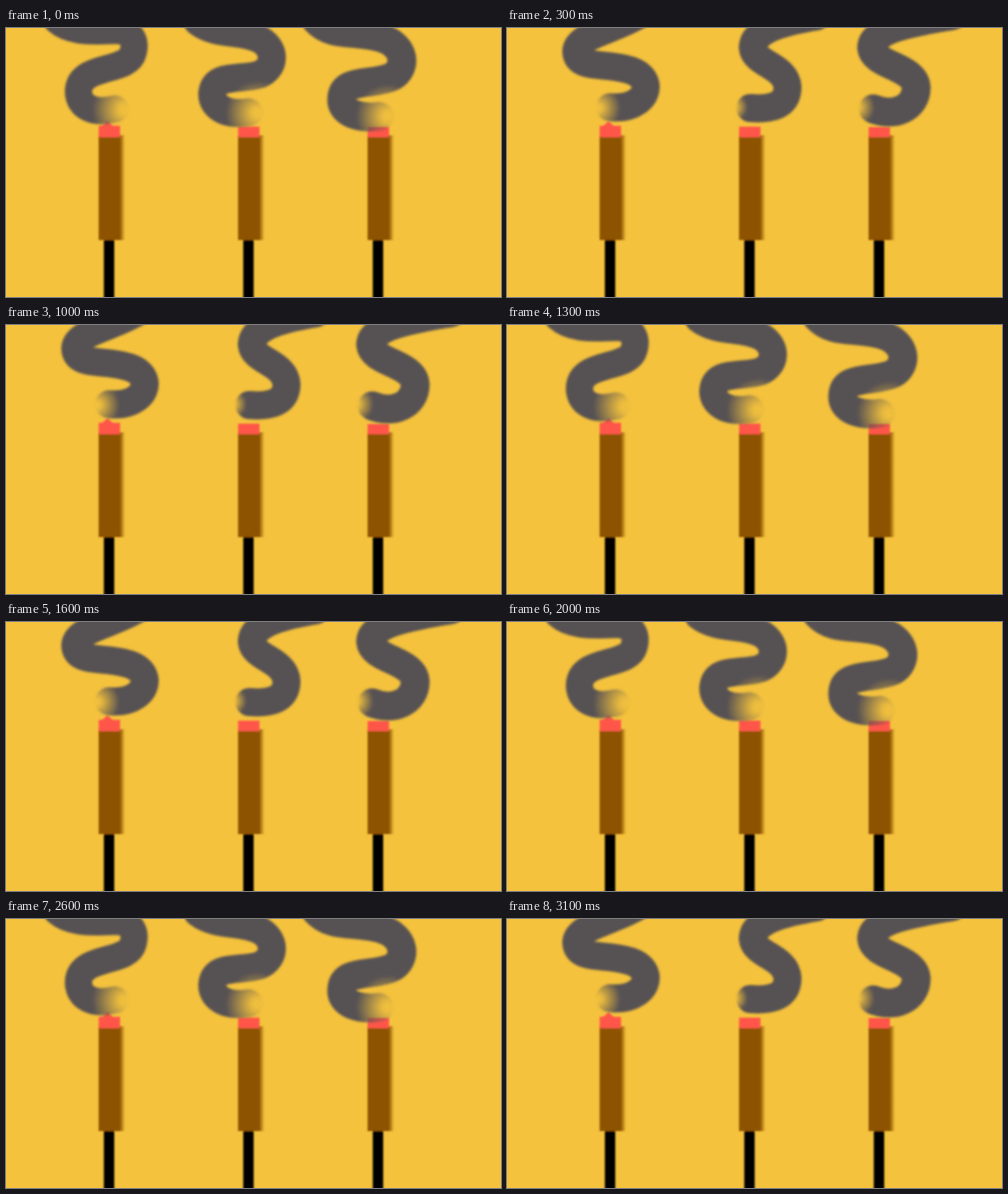
An HTML page for the animation above (3.2 s loop, 600x326 px).

```html
<!DOCTYPE html>
<html lang="en">
<head>
<meta charset="utf-8">
<title>Incense</title>
<style>
html, body { margin: 0; width: 100%; height: 100%; overflow: hidden; background: #f4c23d; }
svg { display: block; width: 100%; height: 100%; }
</style>
</head>
<body>
<svg id="stage" viewBox="0 0 600 326">
  <defs>
    <filter id="soft" filterUnits="userSpaceOnUse" x="-20" y="-60" width="640" height="420"><feGaussianBlur stdDeviation="1.7"/></filter>
    <filter id="crisp" filterUnits="userSpaceOnUse" x="-20" y="-20" width="640" height="380"><feGaussianBlur stdDeviation="0.9"/></filter>
    <linearGradient id="edge">
      <stop offset="0" stop-color="#8d5200"/>
      <stop offset="0.8" stop-color="#8d5200"/>
      <stop offset="1" stop-color="#8d5200" stop-opacity="0"/>
    </linearGradient>
  </defs>
  <rect width="600" height="326" fill="#f4c23d"/>
  <g id="sticks" filter="url(#crisp)"></g>
  <g id="smoke" filter="url(#soft)" fill="none" stroke-linecap="round"></g>
</svg>
<script>
const LOOP = 3200, STEP = 100;
const NS = 'http://www.w3.org/2000/svg';
const $ = id => document.getElementById(id);

function add(parent, tag, attrs) {
  const el = document.createElementNS(NS, tag);
  for (const key in attrs) el.setAttribute(key, attrs[key]);
  parent.appendChild(el);
  return el;
}

function stick(x, tip) {
  const g = $('sticks');
  add(g, 'rect', { x: x + 6.3, y: 255, width: 12.6, height: 80, fill: '#000' });
  add(g, 'rect', { x, y: 130, width: 32, height: 127, fill: 'url(#edge)' });
  add(g, 'path', { d: `M${x} 132.5V${tip}H${x + 26}V132.5Z`, fill: '#ff5648' });
}

// Each plume thins out around its lower end: [path, width, fade x, fade y, fade radius]
const poses = [
  [
    ['M62-9C80 7 110 3 132 3C152 2 158 16 154 30C148 54 92 44 88 74C86 94 104 105 132 98', 33, 144, 99, 40],
    ['M232-8C255 10 285 2 308 14C328 26 326 48 308 56C285 64 252 54 250 80C250 98 270 106 294 102', 34, 305, 103, 39],
    ['M376-9C395 12 425 2 455 12C485 22 486 49 468 59C445 70 408 60 407 86C406 103 428 110 452 107', 35, 463, 107, 39]
  ],
  [
    ['M160-16C130 3 86 8 84 28C84 50 118 42 145 50C172 56 174 78 158 89C148 96 136 97 125 96', 34, 110, 97, 28],
    ['M375-14C345-9 298 0 298 24C300 44 339 46 340 72C340 94 320 99 295 97', 34, 275, 96, 17],
    ['M540-15C500-8 442 0 442 24C444 46 494 46 496 72C496 98 468 108 444 98', 35, 424, 96, 22]
  ]
];

function plume(group, [d, width, cx, cy, r], id) {
  const fade = add($('stage').querySelector('defs'), 'radialGradient',
    { id, gradientUnits: 'userSpaceOnUse', cx, cy, r });
  for (const [offset, opacity] of [[0, 0], [0.2, 0.08], [1, 1]])
    add(fade, 'stop', { offset, 'stop-color': '#565153', 'stop-opacity': opacity });
  add(group, 'path', { d, 'stroke-width': width, stroke: `url(#${id})` });
}

stick(112.3, 118.5);
stick(281.3, 119.5);
stick(438.3, 120);
add($('sticks'), 'path', { d: 'M115 120L123 113L131 120Z', fill: '#ff5648' });

const groups = poses.map((plumes, p) => {
  const g = add($('smoke'), 'g', {});
  plumes.forEach((spec, i) => plume(g, spec, `fade${p}${i}`));
  return g;
});

// Two poses swap three times a second, sampled on a 100 ms grid
function render(ms) {
  const tick = Math.floor((ms % LOOP) / STEP);
  const pose = (tick * 3 + 5) % 20 < 10 ? 0 : 1;
  groups.forEach((g, i) => g.setAttribute('visibility', i === pose ? 'visible' : 'hidden'));
}

const start = performance.now();
function frame() {
  render(performance.now() - start);
  requestAnimationFrame(frame);
}
render(0);
requestAnimationFrame(frame);
</script>
</body>
</html>
```
